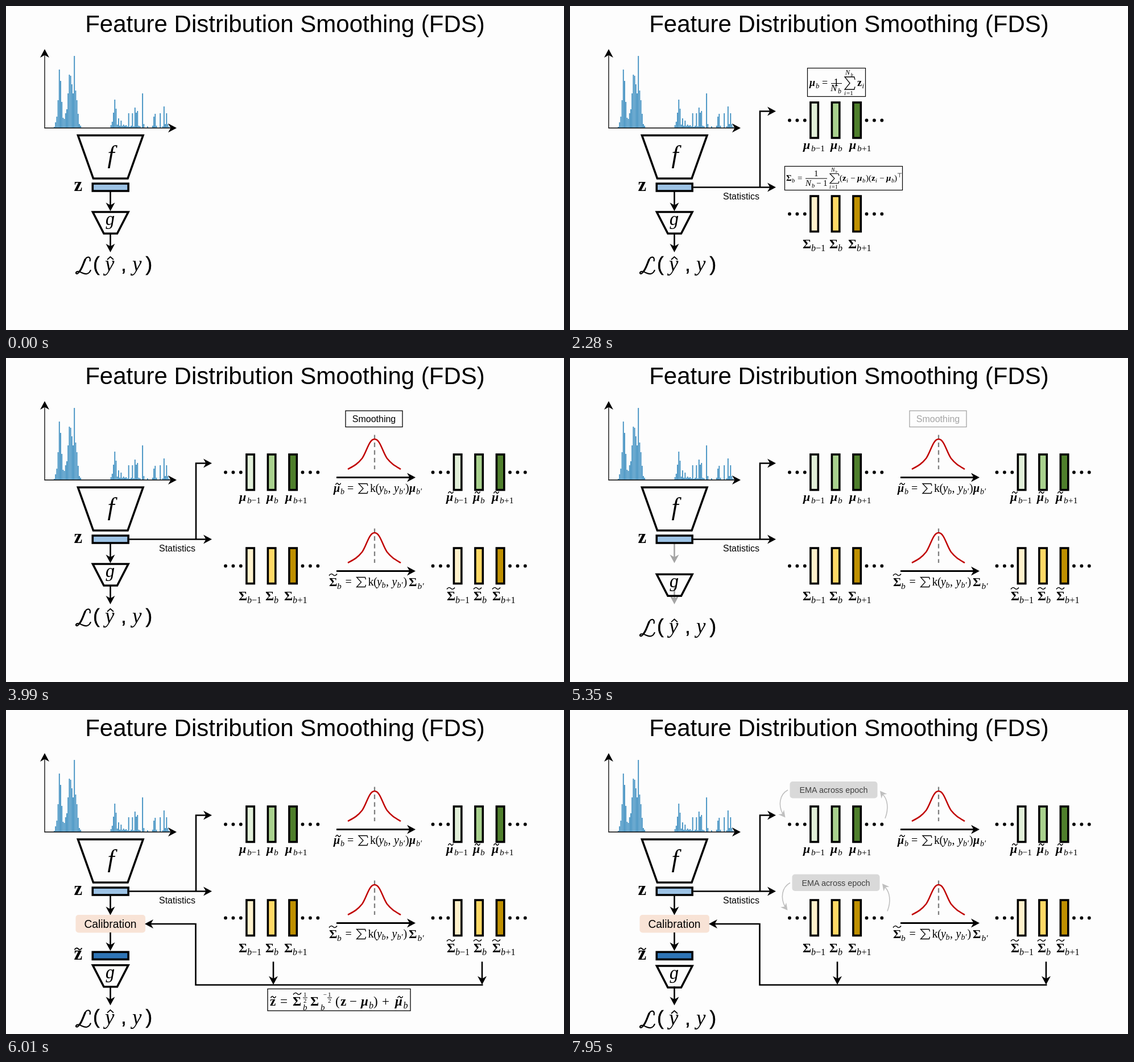
Write an HTML page that moves like this. It is 981x571 px and loops after 7.99 s.

```html
<!DOCTYPE html>
<html lang="en">
<head>
<meta charset="utf-8">
<title>Feature Distribution Smoothing</title>
<style>
html, body { margin: 0; width: 100%; height: 100%; overflow: hidden; background: #fdfdfd; }
svg { display: block; width: 100vw; height: 100vh; }
text { font-family: "Liberation Sans", Arial, sans-serif; }
text.m { font-family: "Liberation Serif", "Times New Roman", serif; }
</style>
</head>
<body>
<svg id="stage" viewBox="0 0 981 571"></svg>
<script>
const LOOP = 7990;
const STARTS = [0, 990, 3040, 5090, 7140];
const FADE = 400;
const INK = '#000';
const stage = document.getElementById('stage');

function el(parent, tag, attrs, text) {
  const node = document.createElementNS('http://www.w3.org/2000/svg', tag);
  for (const k in attrs) node.setAttribute(k, attrs[k]);
  if (text) node.textContent = text;
  parent.appendChild(node);
  return node;
}

const layer = (parent = stage) => el(parent, 'g', {});
const shift = (parent, x, y) => el(parent, 'g', { transform: `translate(${x} ${y})` });

function line(g, d, width, stroke = INK, extra = {}) {
  return el(g, 'path', { d, fill: 'none', stroke, 'stroke-width': width, ...extra });
}

function box(g, x, y, w, h, fill, width, extra = {}) {
  el(g, 'rect', { x, y, width: w, height: h, fill, stroke: width ? INK : 'none', 'stroke-width': width, ...extra });
}

function label(g, x, y, size, text, fill = INK) {
  el(g, 'text', { x, y, fill, 'font-size': size, 'text-anchor': 'middle' }, text);
}

function head(g, x, y, angle, fill = INK, size = 1) {
  el(g, 'path', {
    d: 'M0 0L-15 -8L-10.5 0L-15 8Z', fill,
    transform: `translate(${x} ${y}) rotate(${angle}) scale(${size})`
  });
}

// Polyline whose last point is the arrow tip
function arrow(g, pts, width = 2.6) {
  const p = pts.map(q => q.slice());
  const [ax, ay] = p[p.length - 2], tip = p[p.length - 1];
  const a = Math.atan2(tip[1] - ay, tip[0] - ax);
  head(g, tip[0], tip[1], a * 180 / Math.PI);
  tip[0] -= 9 * Math.cos(a);
  tip[1] -= 9 * Math.sin(a);
  line(g, 'M' + p.join('L'), width);
}

// Math tokens "x + style mark + text"
const STYLES = {
  '*': { bold: 1, italic: 1 }, '!': { bold: 1 }, '/': { italic: 1 }, ':': {},
  '_': { italic: 1, k: 0.7, dy: 0.22 }, ',': { k: 0.7, dy: 0.22 }, '^': { k: 0.7, dy: -0.4 }
};
function math(g, y, size, row) {
  for (const token of row.split(' ')) {
    const [, x, mark, text] = token.match(/^([\d.]+)(.)(.+)$/);
    const s = STYLES[mark];
    el(g, 'text', {
      class: 'm', x, y: y + size * (s.dy || 0), 'font-size': size * (s.k || 1),
      'font-weight': s.bold ? 700 : 400, 'font-style': s.italic ? 'italic' : 'normal'
    }, text);
  }
}

function tilde(g, x, y, w, width = 1.5) {
  line(g, `M${x - w / 2} ${y + 1.5}q${w / 4} -5 ${w / 2} -1.5t${w / 2} -1.5`, width);
}

function sum(g, x, y, w, h, width = 1.3) {
  line(g, `M${x + w} ${y + h * .22}L${x + w * .93} ${y}H${x}L${x + w * .5} ${y + h * .5}L${x} ${y + h}H${x + w * .93}L${x + w} ${y + h * .78}`, width);
}

function trapezoid(g, points) {
  el(g, 'polygon', { points, fill: 'none', stroke: INK, 'stroke-width': 3.6 });
}

const GREENS = ['#e2f0d9', '#a9d18e', '#4f7f2c'];
const GOLDS = ['#fff2cc', '#ffd966', '#bf9000'];
function bins(g, dx, dy, colors) {
  const s = shift(g, dx, dy);
  colors.forEach((c, i) => box(s, 422.9 + i * 37.5, 170, 13.4, 62.5, c, 3.6));
  for (const x of [386, 521.5])
    for (let i = 0; i < 3; i++) el(s, 'circle', { cx: x + i * 13.4, cy: 201.5, r: 2.9 });
}

function histogram(g) {
  const left = [2, 10, 20, 49, 103, 83, 46, 18, 16, 26, 33, 61, 94, 92, 77, 61, 127, 66, 49, 25, 7, 4];
  const right = [5, 11, 27, 50, 34, 6, 17, 4, 13, 4, 6, 4, 5, 3, 26, 2, 4, 26, 3, 36, 27, 30, 4, 3, 0, 61, 7,
    0, 0, 3, 0, 0, 0, 4, 20, 25, 4, 0, 0, 26, 0, 3, 38, 7, 26, 7, 2];
  const bars = (list, x0, step) => list.forEach((h, i) =>
    h && box(g, x0 + i * step - .95, 215 - h, 1.9, h, '#4593c3', 0));
  bars(left, 85, 2.2);
  bars(right, 184.6, 2.22);
  line(g, 'M68 86V215H291', 1.3);
  head(g, 68, 76, -90);
  head(g, 300, 215, 0);
}

const base = layer(), old = layer(), moving = layer(), stats = layer(), sums = layer();
const smooth = layer(), badge = layer(), calib = layer(), rule = layer(), ema = layer();

// Encoder
label(base, 490.5, 46, 42, 'Feature Distribution Smoothing (FDS)');
histogram(base);
trapezoid(base, '126.5,228 241,228 214,304 153.5,304');
math(base, 277, 44, '178.5/f');
math(base, 326, 33, '119.5!z');
box(base, 152.3, 313, 62.8, 13, '#9dc3e6', 3.6);

// Head and loss
arrow(old, [[183.5, 327], [183.5, 361.5]]);
arrow(old, [[183.5, 402], [183.5, 434]]);
trapezoid(moving, '152.5,363 215,363 195.5,401 172,401');
math(moving, 386, 33, '175/ɡ');
line(moving, 'M147.5 450C150 441 142 440 138.500 448C134 458 133 466 126.500 471C122 474 121.500 467.500 127 468C133 468.500 136 473 142 472C146 471 148 468 149 465', 2.2);
line(moving, 'M139.500 446C135 456 134 462 129 468', 3.2);
math(moving, 467, 37, '174/y 222/y');
line(moving, 'M178 447L183.500 442L189 447', 1.7);
for (const [x, c] of [[153, '('], [202, ','], [245.5, ')']])
  el(moving, 'text', { x, y: 466.5, 'font-size': 35, stroke: INK, 'stroke-width': .5 }, c);

// Statistics
arrow(stats, [[217, 319.5], [362, 319.5]]);
arrow(stats, [[334, 319.5], [334, 185.5], [362, 185.5]]);
label(stats, 301, 341, 16, 'Statistics');
bins(stats, 0, 0, GREENS);
bins(stats, 0, 165, GOLDS);
math(stats, 251.5, 22, '410*μ 424_b 431.5,−1 458*μ 471_b 491*μ 505_b 513,+1');
math(stats, 427, 23, '409!Σ 424_b 432,−1 456!Σ 471_b 489!Σ 504_b 512.5,+1');

// Mean and covariance formulas
box(sums, 417.5, 109.5, 102, 50, 'none', 1.2);
math(sums, 141, 18, '421*μ 432_b 443:= 463.5:1 505!z 513.5_i');
math(sums, 150, 17, '458/N 471_b');
line(sums, 'M459 136.500H478', 1);
sum(sums, 483, 125, 18, 22);
math(sums, 121, 12, '484/N 493.5_b');
math(sums, 157, 11, '482/i 486:=1');
box(sums, 377.5, 282.5, 207, 42, 'none', 1.2);
math(sums, 308, 15, '380!Σ 390_b 400:= 474:( 479!z 486_i 493:− 505*μ 514_b 520:) 525:( 530!z 537_i 544:− 556*μ 565_b 570:) 575^⊤');
math(sums, 300, 15, '429:1');
math(sums, 317, 15, '414/N 425_b 433:− 445:1');
line(sums, 'M414 304H452', 1);
sum(sums, 457, 295.5, 16, 17, 1.1);
math(sums, 292, 10, '459/N 466.5_b');
math(sums, 322, 10, '456/i 460:=1');

// Kernel smoothing
const KERNEL = 'M601 196C612 190 618 187 626 177C634 166 638 143 648 143C658 143 662 166 670 177C678 187 684 190 694 196';
for (const dy of [0, 165]) {
  const s = shift(smooth, 0, dy);
  line(s, 'M648 135.500V196', 2.3, '#7f7f7f', { 'stroke-dasharray': '8 5.5' });
  line(s, KERNEL, 2.5, '#c00000');
  arrow(s, [[581, 210.5], [720, 210.5]], 3);
  const f = shift(smooth, dy ? -3.5 : 0, dy);
  sum(f, 620, 221.5, 16, 17);
  math(f, 236, 20, '600:= 640:k 649.5:( 655.5/y 664_b 671.5:, 682/y 691_b′ 702:)');
}
math(smooth, 236, 20, '576*μ 588_b 709*μ 721_b′');
math(smooth, 402, 22, '568!Σ 582_b 708!Σ 723.5_b′');
tilde(smooth, 584, 222, 9);
tilde(smooth, 575, 382, 14);
bins(smooth, 364.5, 0, GREENS);
bins(smooth, 364.5, 165, GOLDS);
math(smooth, 251.5, 22, '774*μ 788_b 795.5,−1 821*μ 834_b 854*μ 868_b 876,+1');
math(smooth, 427, 23, '775!Σ 790_b 798,−1 822!Σ 837_b 855!Σ 870_b 878.5,+1');
for (const x of [782, 829, 862]) {
  tilde(smooth, x, 237, 9);
  tilde(smooth, x, 406, 14);
}
box(badge, 597, 93, 100, 28.5, 'none', 1.3);
label(badge, 647, 113, 16, 'Smoothing');

// Calibration
arrow(calib, [[183.5, 327], [183.5, 361.5]]);
box(calib, 122.5, 361, 122.5, 31.5, '#f8e3d6', 0, { rx: 5 });
label(calib, 183.5, 384, 19.3, 'Calibration');
arrow(calib, [[183.5, 392], [183.5, 424.5]]);
box(calib, 152.3, 426.5, 62.8, 13, '#2e75b6', 3.6);
math(calib, 440, 33, '119.5!z');
tilde(calib, 127, 421, 13, 1.9);
arrow(calib, [[183.5, 487], [183.5, 520.5]]);
arrow(calib, [[470, 443.5], [470, 484]]);
arrow(calib, [[837, 443.5], [837, 484]]);
arrow(calib, [[838.5, 484.5], [333.5, 484.5], [333.5, 377], [244, 377]]);

box(rule, 460, 491.5, 251, 38.5, 'none', 1.3);
math(rule, 521, 23, '464!z 482:= 504!Σ 535!Σ 579:( 588!z 604:− 624*μ 638_b 646:) 661:+ 684*μ 698.5_b');
math(rule, 529, 15, '522/b 553/b');
math(rule, 505, 11, '523:1 557.5:− 566:1');
math(rule, 516, 11, '523:2 566:2');
line(rule, 'M522 507H530M565 507H573', 1);
tilde(rule, 470, 506, 9);
tilde(rule, 512, 500, 14);
tilde(rule, 693, 506, 9);

// Running averages
for (const [x, y] of [[0, 0], [4, 163.5]]) {
  const s = shift(ema, x, y);
  box(s, 386.5, 126, 154, 29.5, '#d9d9d9', 0, { rx: 5 });
  label(s, 463.5, 146, 14.4, 'EMA across epoch', '#404040');
  line(s, 'M383 141C368 149 366 168 374 183', 1.6, '#bfbfbf');
  head(s, 378.5, 189.5, 52, '#bfbfbf', .8);
  line(s, 'M554 191C561 173 558 157 550 149', 1.6, '#bfbfbf');
  head(s, 545, 142.5, -128, '#bfbfbf', .8);
}

const clamp = v => Math.max(0, Math.min(1, v));
const fadeIn = (t, step) => step ? clamp((t - STARTS[step] - FADE) / FADE) : 1;
const fadeOut = (t, step) => step ? 1 - clamp((t - STARTS[step]) / FADE) : 1;

const FADES = [[old, 0, 3], [stats, 1, 0], [sums, 1, 2], [smooth, 2, 0], [badge, 2, 3],
  [calib, 3, 0], [rule, 3, 4], [ema, 4, 0]];

// Soft start, long settling tail
const glide = ms => 1 - Math.exp(-Math.pow(Math.max(0, ms) / 492, 2.3));

function draw(t) {
  for (const [g, on, off] of FADES)
    g.setAttribute('opacity', Math.min(fadeIn(t, on), fadeOut(t, off)));
  moving.setAttribute('transform', `translate(0 ${88 * glide(t - STARTS[3])})`);
}

const begin = performance.now();
function tick() {
  draw((performance.now() - begin) % LOOP);
  requestAnimationFrame(tick);
}
draw(0);
requestAnimationFrame(tick);
</script>
</body>
</html>
```
